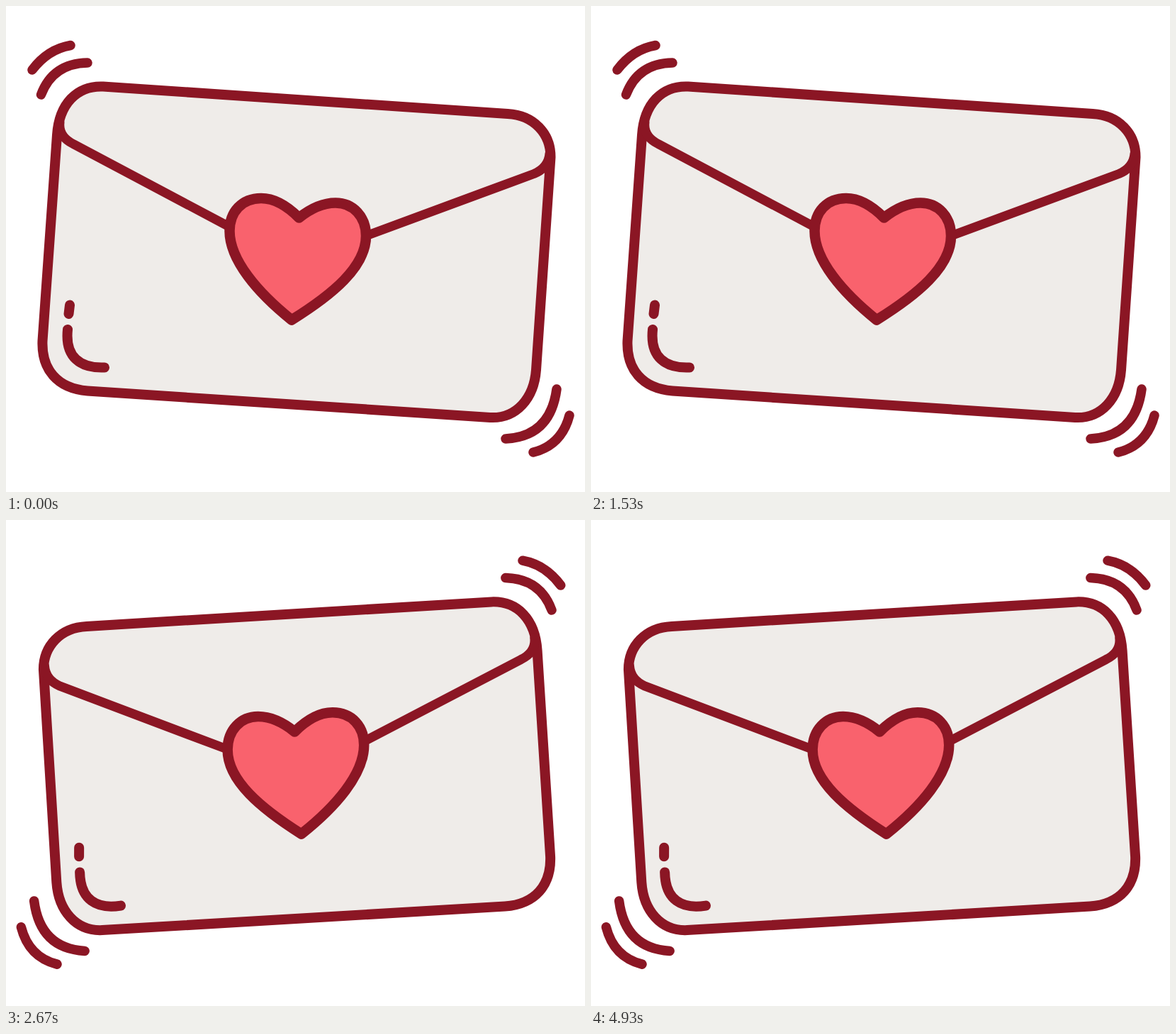
An HTML page that plays this animation: 817 px wide and 685 px high, repeating every 5310 ms.

```html
<!DOCTYPE html>
<html lang="en">
<head>
<meta charset="utf-8">
<title>Love letter</title>
<style>
  html, body { margin: 0; width: 100%; height: 100%; overflow: hidden; background: #fff; }
  svg { display: block; width: 100%; height: 100%; }
  svg g { stroke: #8b1624; stroke-width: 14; stroke-linecap: round; stroke-linejoin: round; }
</style>
</head>
<body>
<svg viewBox="0 0 817 685" fill="none">
  <g id="letter">
    <path fill="#efece9" d="M137 113.5L708 152C745 154 768.5 180 768.5 213L748 513C745 553 720 582 683 580L115 542.5C72 539 50 512 51.5 472L72 182C75 138 100 112 137 113.5Z"/>
    <path stroke-width="13" d="M76 164C74 180 84 189 95 194.500L312 309.500M767 208C766 222 758 231 745 236.500L512 322.500"/>
    <path fill="#f9626d" stroke-width="14.500" d="M413.500 298.500C398 283 380 271 360 271C333 271 315.500 290 315.500 317C315.500 358 355 404 403 442.500C460 407 508 368 508 324C508 297 490 277.500 465 277.500C445 277.500 428 287 413.500 298.500Z"/>
  </g>
  <g id="shine">
    <path d="M90 421.500L88.500 434M87 456C83 495 105 511 139 509.500"/>
  </g>
  <g id="waves">
    <path stroke-width="13.500" d="M37 90Q59 61 91 55.500M49.500 125Q66 81 115 80M705 610Q768 607 777 540M795 577Q784 619 744 629"/>
  </g>
</svg>
<script>
  const LOOP = 5310;
  const flips = [370, 770, 1130, 1530, 1900, 2300, 2670, 3070, 3400, 3800, 4170, 4570, 4930];

  // The left tilt mirrors the letter and its waves; the shine only turns.
  const leftTilt = {
    letter: 'rotate(.4 410 343) translate(820.5 0) scale(-1 1)',
    shine: 'translate(2 4) rotate(-6.6 410 343)',
    waves: 'rotate(.4 410 343) translate(818 -.5) scale(-1 1)'
  };

  function draw() {
    const time = performance.now() % LOOP;
    const tilted = flips.filter(flip => flip <= time).length % 2;
    for (const id in leftTilt) {
      document.getElementById(id).setAttribute('transform', tilted ? leftTilt[id] : '');
    }
    requestAnimationFrame(draw);
  }
  draw();
</script>
</body>
</html>
```
